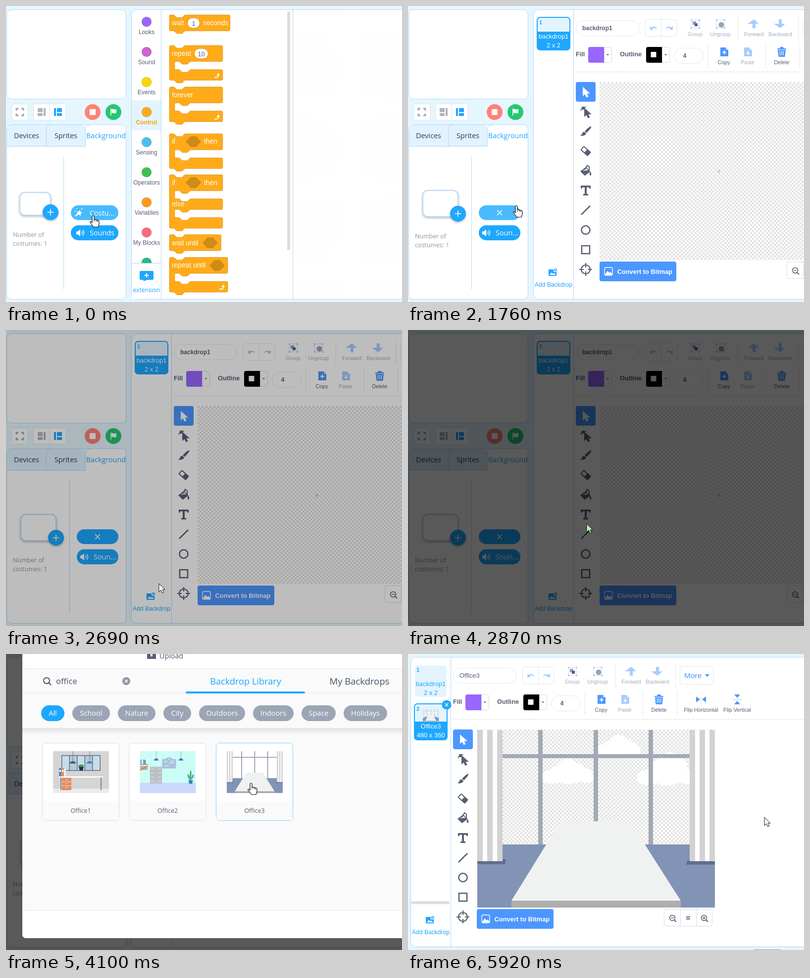
Write an HTML page that moves like this. It is 800 px wide and 600 px high and loops after 6.91 s.

```html
<!DOCTYPE html>
<html lang="en">
<head>
<meta charset="utf-8">
<title>Choosing a backdrop</title>
<style>
html, body { margin: 0; height: 100%; overflow: hidden; }
svg { display: block; width: 800px; height: 600px; font-family: "Liberation Sans", Arial, sans-serif; }
.ui { font-family: "Open Sans", "Noto Sans", sans-serif; }
.soft { filter: drop-shadow(0 2px 2px #0004); }
</style>
</head>
<body>
<svg id="stage" viewBox="0 0 800 600"></svg>
<script>
const BLUE = '#1ea7ff', PAINT = '#4c97ff', INK = '#575e75', EDGE = '#b4d8f8', PALE = '#e3f4ff', DARK = '#cf8b17', HOVER = '#4abaff';
const MID = ' text-anchor="middle" ', BOLD = ' font-weight="700" ', UI = ' class="ui" ', SOFT = ' class="soft" ';

const rect = (x, y, w, h, fill, r = 0, opt = '') => `<rect x="${x}" y="${y}" width="${w}" height="${h}" rx="${r}" fill="${fill}" ${opt}/>`;
const disc = (x, y, r, fill, opt = '') => `<circle cx="${x}" cy="${y}" r="${r}" fill="${fill}" ${opt}/>`;
const path = (d, fill, opt = '') => `<path d="${d}" fill="${fill}" ${opt}/>`;
const line = (d, color, w = 1, opt = '') => path(d, 'none', `stroke="${color}" stroke-width="${w}" ${opt}`);
const text = (x, y, s, size, fill = INK, opt = '') => `<text x="${x}" y="${y}" font-size="${size}" fill="${fill}" ${opt}>${s}</text>`;
const group = (id, body, opt = '') => `<g id="${id}" ${opt}>${body}</g>`;
const at = (x, y, body, k = 1) => `<g transform="translate(${x} ${y}) scale(${k})">${body}</g>`;
const border = (color, w = 1) => `stroke="${color}" stroke-width="${w}"`;
const plus = (x, y, r, color, w = 2) => line(`M${x - r} ${y}h${2 * r}M${x} ${y - r}v${2 * r}`, color, w);
const cross = (x, y, r, color, w = 2) => line(`M${x - r} ${y - r}l${2 * r} ${2 * r}m0 ${-2 * r}l${-2 * r} ${2 * r}`, color, w);

// Left column
const sidebar = () =>
  rect(1.5, 7.5, 241, 181, '#fff', 10, border(EDGE)) +
  rect(11.5, 198.5, 33, 33, '#fff', 4, border('#cfe4f7')) +
  line('M21 212v-4h4m6 0h4v4m0 6v4h-4m-6 0h-4v-4', '#a3a8b3', 3) +
  rect(55.5, 198.5, 66, 33, '#fff', 4, border('#cfe4f7')) + line('M88.5 199v32', '#cfe4f7') +
  path('M64 207h10v8h-10zM64 217h10v6h-10zM76 207h4v16h-4z', '#b0b4bd') +
  path('M97 207h4v16h-4zM103 207h10v8h-10zM103 217h10v6h-10z', BLUE) +
  disc(175, 215, 16, '#ff8276') + rect(169, 209, 12, 12, '#fff', 1) +
  disc(217, 215, 16, '#23c871') + path('M211 208h1.6v14h-1.6zM213 209c3-1 5 2 10 0v8c-5 2-7-1-10 0z', '#fff') +
  rect(1.5, 240.5, 241, 354, '#fff', 10, border(EDGE)) +
  path('M2 284V251q0-10 10-10H151q10 0 10 10V284z', '#e0f3ff') +
  line('M2 284.5H160.5V251q0-10 10-10M81.5 284V250q0-9 9-9', EDGE) +
  text(41.5, 268, 'Devices', 14.4, '#333d4d', MID + UI) + text(121, 268, 'Sprites', 14.4, '#333d4d', MID + UI) +
  text(202, 268, 'Background', 14.3, BLUE, MID + UI);

const speaker = path('M-8-3h3l5-4v14l-5-4h-3z', '#fff') + line('M3-3q2 3 0 6M5-6q5 6 0 12', '#fff', 1.4);
const costumes = (id, split, x, y, w, h, noteY, pillX, labelX, pillBody, sound) => group(id,
  line(`M${split + .5} 305V574`, EDGE) +
  rect(x + 1, y + 1, w - 1, h - 1, '#fff', 10, border('#bcd8f6', 2) + SOFT) +
  disc(x + w, y + h - 6, 16, BLUE, SOFT) + plus(x + w, y + h - 6, 6.5, '#fff', 1.6) +
  text(14, noteY, 'Number of', 12.4, '#8a94a6', UI) + text(14, noteY + 18, 'costumes: 1', 12.4, '#8a94a6', UI) +
  rect(pillX, 404, 227 - pillX, 30, HOVER, 15, `id="${id}Pill"`) + pillBody +
  rect(pillX, 444.5, 227 - pillX, 30.5, BLUE, 15) + at(labelX - 19, 460, speaker) +
  text(labelX, 465, sound, 14.4, '#fff', UI));

// Block palette
const NOTCH = 'c2 0 3 1 4 2l4 4c1 1 2 2 4 2h12c2 0 3-1 4-2l4-4c1-1 2-2 4-2';
const TAB = 'c-2 0-3 1-4 2l-4 4c-1 1-2 2-4 2h-12c-2 0-3-1-4-2l-4-4c-1-1-2-2-4-2';
const block = (y, w, rows) => {
  let d = `M0 4a4 4 0 0 1 4-4h8${NOTCH}H${w - 4}`;
  rows.forEach((h, i) => {
    d += `a4 4 0 0 1 4 4v${h - 8}a4 4 0 0 1-4 4`;
    d += i < rows.length - 1
      ? `H64${TAB}h-8a4 4 0 0 0-4 4v16a4 4 0 0 0 4 4h8${NOTCH}H${w - 4}`
      : `H48${TAB}H4a4 4 0 0 1-4-4z`;
  });
  return at(330, y, path(d, '#ffab19', border(DARK)), .678);
};
const word = (x, y, s) => text(x, y, s, 13.8, '#fff');
const slot = (x, y, w, s) => rect(x, y, w, 21, '#fff', 10.5, border(DARK)) + text(x + w / 2, y + 15.5, s, 13, INK, MID);
const hexagon = (x, y) => path(`M${x} ${y}l10-11h11l10 11-10 11h-11z`, DARK);
const loopArrow = (x, y) => at(x, y, line('M-5 4h4q4 0 4-5', '#fff', 1.8) + path('M-1 0l4-5 3 5z', '#fff'));

const categories = [['Looks', '#9966ff'], ['Sound', '#cf63cf'], ['Events', '#ffd500'], ['Control', '#ffab19'], ['Sensing', '#4cbfee'],
  ['Operators', '#40bf57'], ['Variables', '#ff9a1a'], ['My Blocks', '#ff6680'], ['', '#21bd8c']];
const palette = () => group('palette',
  rect(254, 191, 59, 61, PALE) +
  categories.map(([name, color], i) => disc(284, 32 + 61 * i, 9.8, color, 'stroke="#0003"') +
    text(284, 57 + 61 * i, name, 12, i === 3 ? '#ff9f0a' : INK, MID + (i === 3 ? BOLD : ''))).join('') +
  rect(254, 521, 59, 73, '#fff') +
  line('M254 521.5h59M313.5 8V594M579.5 8V594', EDGE) +
  path('M272 537h24q2 0 2 2v14q0 2-2 2h-12l-2 2h-4l-2-2h-4q-2 0-2-2v-14q0-2 2-2z', BLUE) + plus(284, 546, 4.5, '#fff') +
  text(284, 580, 'extension', 12.1, BLUE, MID + UI) +
  rect(568, 11, 6, 484, '#dcdcdc', 3) + rect(580, 9, 220, 585, 'url(#dots)') +
  block(18, 181, [48]) + word(335, 39, 'wait') + slot(366.5, 24, 25, '1') + word(398, 39, 'seconds') +
  block(80, 159, [48, 32]) + word(335, 101, 'repeat') + slot(380.5, 86, 28, '10') + loopArrow(426, 141) +
  block(164, 159, [48, 32]) + word(335, 185, 'forever') + loopArrow(426, 225) +
  block(259, 159, [48, 32]) + word(335, 279, 'if') + hexagon(363, 275) + word(400, 279, 'then') +
  block(342, 159, [48, 32, 32]) + word(335, 363, 'if') + hexagon(363, 358) + word(400, 363, 'then') + word(335, 406, 'else') +
  block(463.5, 154, [48]) + word(335, 485, 'wait until') + hexagon(397, 480) +
  block(509.5, 174, [48, 32]) + word(335, 530, 'repeat until') + hexagon(411, 526) + loopArrow(436, 570));

// Meeting room, 480 x 360
const stripes = x => rect(x, 0, 51, 266, '#d2d2d2') + rect(x + 11, 0, 9, 266, '#fff') + rect(x + 31, 0, 9, 266, '#fff');
const cloud = (x, y, w) => at(x, y, path('M-50 22Q-54 2-34 0Q-30-10-20-8Q-4-34 20-12Q26-14 32-4Q52 0 50 22Q36 28 24 22Q4 32-14 24Q-34 30-50 22z', '#fff'), w / 100);
const meetingRoom = () =>
  cloud(285, 29, 88) + cloud(183, 81, 104) + cloud(381, 81, 114) + cloud(389, 60, 70) +
  rect(0, 232, 480, 128, '#8194b6') +
  path('M123 0h9v232h-9zM235 0h9v232h-9zM346 0h9v232h-9zM50 49h380v8H50z', '#a3a9b6') +
  path('M0 266H50V262H58L56 272H0zM424 264H480V273H422z', '#5f6e8d') + stripes(0) + stripes(429) +
  path('M69 346L157 203Q168 185 178 185H301Q308 185 320 203L411 346z', '#f0f2f1') + rect(69, 346, 342, 14, '#aeaeae');

// Paint editor
const label = (x, y, s, color = INK) => text(x, y, s, 10.8, color, MID);
const vdash = (x, y, h) => line(`M${x} ${y}v${h}`, '#ccc', 1, 'stroke-dasharray="2 2"');
const curl = path('M-7-4v7h7l-2.5-2.3q6-3 9.500 2.300q-2-9-11-4.800z', '#a8ccff');
const groupIcon = round => rect(-8, -8, 16, 16, 'none', 0, border('#a8ccff') + 'stroke-dasharray="3 1"') +
  [-9, 7].map(x => [-9, 7].map(y => rect(x, y, 3, 3, '#a8ccff')).join('')).join('') +
  (round ? disc(2, 2, 5.5, '#9aa1b2') : rect(-5, -5, 7, 7, '#9aa1b2') + rect(-1, -1, 6, 6, INK));
const sheet = color => path('M-8-9h11l5 5v13h-16z', color) + path('M3-9l5 5h-5z', '#fff', 'opacity=".6"');
const upArrow = path('M0-9l10 9H3v9h-6V0h-10z', '#a8ccff');
const pointer = color => path('M-6-10V9l4.500-4 3 6.500 4-2-3-6h6.500z', color);
const picture = color => path('M-8-6h10v5h6v8h-16z', color) + path('M-6 5l4-5 3 3 2-2 4 4z', '#fff') + disc(6, -5, 3, color) + plus(6, -5, 2, '#fff', 1);
const lens = line('M4 4l4 4', INK, 1.8) + disc(0, 0, 5.500, 'none', border(INK, 1.500));
const swatch = (x, color) => rect(x + .5, 83.5, 47, 31, '#fff', 4, border('#d9d9d9')) +
  path(`M${x + 32} 83h-28q-4 0-4 4v24q0 4 4 4h28z`, color) + line(`M${x + 32.5} 83v32`, '#d9d9d9') + path(`M${x + 37} 97.5h5l-2.5 3z`, INK);

const tools = [
  pointer('#fff'),
  at(3, 2, pointer(INK)) + line('M-10-2Q-8-9 1-9', INK, 1.6) + rect(-8, -10, 6, 6, INK, 1),
  path('M11-10Q13-8 2 3L-2 0Q8-11 11-10zM-3 1L1 4Q0 10-11 9Q-8 7-7 4Q-6 1-3 1z', INK),
  at(0, 0, '<g transform="rotate(42)">' + rect(-10, -5.5, 20, 11, INK, 2) + rect(-8, -3.5, 8, 7, '#fff') + '</g>'),
  path('M-11 1L1-8 9 2-2 10z', INK) + path('M-6 0L1-5 5-1z', '#fff') + line('M-2-2L3-11 7-8V2', INK, 2) + path('M9 1q4 6 1 9-4-1-1-9z', INK),
  path('M-10-10H10v6H7v-2.500H2V7h3v3H-5V7h3V-6.500h-5V-4h-3z', INK),
  line('M-9 9L9-9', INK, 2.5),
  disc(0, 0, 8.5, 'none', border(INK, 2.5)),
  rect(-8, -8, 16, 16, 'none', 0, border(INK, 2.5)),
  disc(0, 0, 9, 'none', border(INK, 2.2)) + line('M0-13v9M0 4v9M-13 0h9M4 0h9', INK, 2.2)
];

const costumeText = (y, name, size, color) => text(294, y, name, 13, color, MID) + text(294, y + 18, size, 13, color, MID);
const activeCard = (y, h, n, thumb = '') => rect(261, y, 66, h, PALE, 6) + thumb +
  path(`M261 ${y + h - 37}h66v31q0 6-6 6h-54q-6 0-6-6z`, BLUE) + rect(261, y, 66, h, 'none', 6, border(BLUE, 2)) +
  text(265, y + 14, n, 11, BLUE, BOLD);

const editor = () => group('editor',
  line('M334.5 8V594', EDGE) +
  group('first', activeCard(23, 66, '1') + costumeText(66, 'backdrop1', '2 x 2', '#fff')) +
  group('second', rect(262, 24, 64, 64, PALE, 6) + text(265, 37, '1', 11, BLUE, BOLD) + costumeText(66, 'backdrop1', '2 x 2', BLUE) +
    activeCard(102, 73, '2', at(278, 113, meetingRoom(), .067)) + costumeText(152, 'Office3', '480 x 360', '#fff') +
    disc(326, 104, 9.5, BLUE) + cross(326, 104, 3.2, '#fff', 1.4) +
    rect(254, 502, 78, 6, '#dedede', 3) + line('M948 600.5h53', '#666', 1, 'stroke-dasharray="2 1"')) +
  group('add', at(292, 540, picture(BLUE)) + text(294, 569, 'Add Backdrop', 12.1, BLUE, MID)) +
  group('paint',
    rect(339.5, 29.5, 127, 31, '#fff', 15.5, border('#e6e8ee')) +
    text(352, 49, 'backdrop1', 12, INK, BOLD + 'id="name1"') + text(352, 49, 'Office3', 12.9, INK, 'id="name2"') +
    rect(479.5, 27.5, 64, 34, '#fff', 4, border('#e3e6ec')) + line('M511.5 28v33', '#e3e6ec') +
    at(496, 45, curl) + at(528, 45, '<g transform="scale(-1 1)">' + curl + '</g>') +
    at(580, 36, groupIcon(false)) + label(580, 61, 'Group', '#a6abb9') +
    at(631, 36, groupIcon(true)) + label(631, 61, 'Ungroup', '#a6abb9') +
    vdash(666.5, 20, 50) + at(699, 36, upArrow) + label(699, 61, 'Forward', '#a6abb9') +
    at(752, 36, '<g transform="scale(1 -1)">' + upArrow + '</g>') + label(752, 61, 'Backward', '#a6abb9') + vdash(788.5, 20, 50) +
    rect(797.5, 26.5, 68, 36, '#fff', 4, border('#e3e6ec')) + text(806, 50, 'More', 15.5, PAINT) + path('M848 42h9l-4.5 5.500z', PAINT) +
    text(339, 102, 'Fill', 12.6, INK, BOLD) + swatch(364, '#9966ff') +
    text(428, 102, 'Outline', 12.8, INK, BOLD) + swatch(481, '#000') + rect(490.5, 93, 11, 11, '#fff') +
    rect(537.5, 85.5, 59, 31, '#fff', 15.5, border('#e6e8ee')) + text(559, 105, '4', 12, INK, MID + BOLD) + vdash(605.5, 78, 48) +
    at(639, 93, sheet(PAINT) + plus(0, 1, 4, '#fff')) + label(638, 118, 'Copy') +
    at(687, 93, sheet('#a8ccff') + path('M0 6l-4-4h3v-4h2v4h3z', '#fff')) + label(686, 118, 'Paste', '#a6abb9') + vdash(722.5, 78, 48) +
    path('M746 86h5l1-3h6l1 3h5v2h-18zM747 89h16l-1.500 14h-13z', PAINT) + line('M751.5 91v9m3.5-9v9m3.500-9v9', '#fff', 1.3) + label(755, 118, 'Delete') +
    vdash(791.5, 78, 48) + path('M830 87l8 6-8 6zM850 87l-8 6 8 6z', PAINT) + vdash(840, 84, 18) + label(840, 118, 'Flip Horizontal') +
    path('M907 83h12l-6 7zM907 103h12l-6-7z', PAINT) + line('M904 93h18', PAINT, 1, 'stroke-dasharray="2 2"') + label(913, 118, 'Flip Vertical') +
    line('M339 133.500H1100', '#d5d5d5', 1, 'stroke-dasharray="3 2"') +
    rect(339, 154, 40, 40, PAINT, 4) + tools.map((icon, i) => at(359, 174 + 40 * i, icon)).join('') +
    rect(387, 154, 481, 361, 'url(#checker)') + path('M628 331l4 4-4 4-4-4z', '#d2d2d2') +
    group('room', meetingRoom(), 'transform="translate(388 155)"') +
    rect(387, 518, 155, 40, PAINT, 4) +
    at(405, 538, rect(-8, -8, 16, 16, 'none', 3, border('#fff', 1.4)) + path('M-7 6l5-7 4 4 2-2 4 5v1h-15z', '#fff')) +
    text(422.5, 542.5, 'Convert to Bitmap', 12.9, '#fff', BOLD) +
    rect(765.5, 518.500, 97, 34, '#fff', 4, border('#d9dce3')) + line('M798.5 519v33M830.5 519v33', '#d9dce3') +
    at(782, 536, lens + line('M-3 0h6', INK, 1.4)) + line('M810 534h8m-8 4h8', INK, 1.8) + at(846, 536, lens + plus(0, 0, 3, INK, 1.4))));

// Library thumbnails, 113 x 85
const office1 = rect(0, 0, 113, 85, '#d5d5d5') + rect(0, 76, 113, 9, '#ebebeb') +
  rect(17, 8, 79, 32, '#5d6c86') + [0, 1, 2, 3, 4].map(i => rect(18.5 + 15.5 * i, 9.500, 14, 29, i % 2 ? '#b5cade' : '#c9dcea')).join('') +
  line('M40 0v19M74 0v19', '#666', .8) + path('M33 25q7-10 14 0z', '#2d6e55') + path('M67 25q7-10 14 0z', '#4c80b5') +
  path('M52 32h10l-2 7h-6z', '#2b2d38') + path('M51 32q0-5 6-5 6 0 5 5z', '#3b9b5c') +
  rect(12, 51, 89, 2.500, '#fff') + line('M16 53v26M97 53v26', '#777e88', 1.800) +
  rect(18, 54, 19, 25, '#e58b62') + line('M18 62h19m-19 8h19M25 58h5m-5 8h5m-5 8h5', '#fff', .8) +
  rect(12, 34, 5, 17, '#5a8dbc') + rect(17, 34, 5, 17, '#e58b62') + rect(22, 36, 4, 15, '#eee') + rect(13, 38, 3, 4, '#fff') + rect(18, 38, 3, 4, '#fff');
const office2 = rect(0, 0, 113, 85, '#cbfdf6') + rect(0, 64, 113, 21, '#ccd9fc') +
  rect(21, 32, 23, 33, '#c5c9ce', 0, border('#a5abb2', .8)) + line('M21 40h23m-23 8h23m-23 8h23M30 36h5m-5 8h5m-5 8h5m-5 8h5', '#949ba5', .9) +
  line('M33 0v12M83 0v12', '#8a98a8', .8) + path('M28 19q5-10 10 0zM78 19q5-10 10 0z', '#487fc0') +
  line('M48 18l11-5 10 5', '#64748a', 1) + rect(45, 16, 28, 19, '#a9c1dd') + line('M49 21h7m3 3h10m-19 6h8m4-10h7', '#c5d7ea', 3) +
  [0, 1, 2, 3, 4].map(i => rect(1 + 3 * i, 17 + i % 2, 2.400, 9, ['#54a6cd', '#fff', '#477bb5'][i % 3]) + rect(1 + 3 * i, 30, 2, 8, ['#e5784e', '#54a6cd'][i % 2])).join('') +
  line('M0 27h17M0 39l16-9', '#dc7950', 1.5) +
  path('M102 60Q94 51 97 46Q102 50 102 60Q99 42 103 38Q106 44 102 60Q105 46 109 47Q110 53 102 60z', '#52ad83') + path('M98 59h9l-1.500 7h-6z', '#3f7fc0');
const outdoors = i => {
  const hue = 95 + i * 31;
  return rect(0, 0, 113, 85, `hsl(${195 + i * 9} 70% 84%)`) + disc(24 + i * 7, 19, 8, '#fff5c9') +
    path('M0 56Q28 30 58 52T113 45V85H0z', `hsl(${hue} 40% 68%)`) + path('M0 68Q50 55 113 70V85H0z', `hsl(${hue} 40% 56%)`);
};
const card = (x, y, name, scene, id = '') =>
  rect(x + .5, y + .5, 155, 157, '#fff', 7, border('#dcdcdc') + (id && `id="${id}"`)) +
  path(`M${x + 1} ${y + 118}h154v33q0 6-6 6h-142q-6 0-6-6z`, '#fafafa') + at(x + 22, y + 17, scene) +
  text(x + 78, y + 142, name, 12.4, INK, MID + UI);

const tags = [['All', 71, 47], ['School', 134, 76], ['Nature', 226, 76], ['City', 318, 56], ['Outdoors', 390, 93], ['Indoors', 499, 82], ['Space', 597, 69], ['Holidays', 682, 88]];
const scenery = ['Meadow', 'Harbor1', 'Desert', 'Village2', 'Hills', 'Seaside', 'Garden1', 'Canyon', 'Lake2', 'Farm'];
const library = () => group('library',
  rect(33, -22, 1117, 598, '#fafafa', 8) +
  path('M33 29V-14q0-8 8-8H1142q8 0 8 8V29z', '#fff') + path('M33 520H1150V568q0 8-8 8H41q-8 0-8-8z', '#fff') +
  rect(33, 150, 1117, 14, 'url(#fade)') + line('M33 29.5H1150M33 79.5H1150M33 519.5H1150', '#e4e6e8') +
  path('M285 0h5v-3h-3l7-7 7 7h-3v3h5v10h-18z', INK) + rect(292, -3, 4, 8, '#fff') + text(310, 9, 'Upload', 14.3, '#46536a', UI) +
  at(844, 1, line('M-6-6L6 6M-6 6L6-6', INK, 3.5) + line('M-8 2l5 5M3-7l5 5', INK, 2)) + text(858, 9, 'Paint', 14.6, '#46536a', UI) +
  disc(82, 54, 6, 'none', border('#46536a', 2)) + line('M86 58l5 5', '#46536a', 2.2) +
  group('hint', text(101, 61, 'Search', 16.6, '#b5bac4', UI)) +
  group('query', text(101, 61, 'office', 16.6, '#46536a', UI) + disc(243, 55, 8, '#8e97a5') + cross(243, 55, 3, '#fff', 1.6)) +
  group('caret', line('M145.5 45v21', '#333')) +
  text(484, 62, 'Backdrop Library', 18.2, BLUE, MID + UI) + text(714, 62, 'My Backdrops', 18.5, '#46536a', MID + UI) + rect(363, 76, 241, 4, BLUE, 2) +
  tags.map(([name, x, w], i) => rect(x, 104, w, 32, i ? '#9ca5b5' : BLUE, 16) + text(x + w / 2, 125, name, 14.5, '#fff', MID + UI + 'font-weight="500"')).join('') +
  group('everything', scenery.map((name, i) => card(73 + 175.5 * (i % 5), i < 5 ? 180 : 358, name, outdoors(i))).join('')) +
  group('found', card(73, 180, 'Office1', office1) + card(248.5, 180, 'Office2', office2) + card(424, 180, 'Office3', at(0, 0, meetingRoom(), .2354), 'pick')) +
  rect(845.5, 532.5, 127, 31, '#fff', 15.5, border(BLUE)) + text(909, 553, 'Cancel', 14.3, BLUE, MID + UI) +
  rect(993, 532, 128, 32, BLUE, 16, 'id="ok"') + text(1057, 553, 'OK', 14.3, '#fff', MID + UI));

const $ = id => document.getElementById(id);
const set = (id, attrs) => Object.entries(attrs).forEach(([k, v]) => $(id).setAttribute(k, v));
const show = (id, on) => $(id).setAttribute('display', on ? 'inline' : 'none');

$('stage').innerHTML = `<defs>
  <pattern id="checker" width="8" height="8" patternUnits="userSpaceOnUse" x="387" y="154">${rect(0, 0, 8, 8, '#fff') + path('M0 0h4v8h4v-4H0z', '#e3e3e3')}</pattern>
  <pattern id="dots" width="18" height="18" patternUnits="userSpaceOnUse" x="583" y="9">${rect(8, 8, 1.500, 1.500, '#dedede')}</pattern>
  <linearGradient id="fade" x2="0" y2="1"><stop stop-color="#000" stop-opacity=".1"/><stop offset="1" stop-color="#000" stop-opacity="0"/></linearGradient></defs>` +
  rect(0, 0, 800, 600, '#e6f6ff') +
  group('camera', sidebar() +
    costumes('idle', 116, 27, 377, 63, 47, 468, 131, 169,
      at(147, 419, line('M-7 7L0 0', '#fff', 2.500) + path('M2-6l1 4 4 1-3 3 0 4-4-2-4 1 2-4-2-4 4 1z', '#fff') + line('M-4-7v-2M5-6l2-3M-7-3h-2', '#fff', 1.4)) + text(169, 424.5, 'Costu...', 14.4, '#fff', UI), 'Sounds') +
    costumes('open', 128, 29, 373, 72, 54, 471, 143, 177, cross(185, 419, 5, '#fff', 1.7), 'Soun...') +
    rect(253.5, 7.5, 1000, 587, '#fff', 10, border(EDGE)) + palette() + editor()) +
  rect(0, 0, 800, 600, '#000', 0, 'id="dim"') + library() +
  group('arrow', path('M0 0V17l4-4 2.800 6 2.800-1.300L7 12h5z', '#fff', border('#111') + 'id="tip"')) +
  group('hand', path('M-2 2c0-3 4-3 4 0v6q3-1 4 1 3-1 3 1 3-1 3 2v5l-2 6H1l-7-9c-1-2 1-3 3-1l1 1z', '#fff', border('#111', 1.200)) + line('M2 8v4M6 9v3M9 10v3', '#111', .9));

// Each step keeps everything it does not change
const steps = [
  [0, { view: 'blocks', hand: true, x: 176, y: 425, pill: HOVER, dim: 0, modal: 0, shift: [0, 0], cards: '', pick: 0, tip: '#fff', add: 1, ok: BLUE }],
  [620, { pill: '#1590e2' }],
  [720, { pill: HOVER }],
  [1290, { view: 'opening' }],
  [1400, { view: 'editor' }],
  [1760, { x: 219, y: 405 }],
  [1850, { hand: false, x: 240, y: 432, pill: BLUE }],
  [1940, { x: 259, y: 466 }],
  [2030, { x: 273, y: 500 }],
  [2130, { x: 287, y: 528 }],
  [2220, { hand: true, x: 296, y: 548, add: .7 }],
  [2430, { add: 1 }],
  [2510, { hand: false, dim: .04 }],
  [2600, { x: 300, y: 540, dim: .12 }],
  [2690, { x: 309, y: 514, dim: .26 }],
  [2790, { x: 335, y: 455, dim: .48 }],
  [2870, { x: 361, y: 393, dim: .65, tip: '#b6f5b6' }],
  [2970, { x: 385, y: 335, tip: '#fff' }],
  [3050, { x: 400, y: 300 }],
  [3150, { modal: .35 }],
  [3240, { modal: .7 }],
  [3340, { modal: 1 }],
  [3610, { cards: 'all' }],
  [4100, { cards: 'office', hand: true, x: 495, y: 262, pick: 1 }],
  [4180, { caret: true }],
  [4460, { caret: false, pick: 2 }],
  [4550, { pick: 3 }],
  [5100, { shift: [-351, 22], hand: false, x: 671, y: 430 }],
  [5180, { x: 676, y: 452 }],
  [5270, { x: 684, y: 488 }],
  [5370, { x: 692, y: 526 }],
  [5460, { hand: true, x: 699, y: 556, ok: HOVER }],
  [5560, { x: 703, y: 565 }],
  [5650, { x: 705, y: 568 }],
  [5820, { modal: .5, dim: .45 }],
  [5870, { view: 'done', modal: 0, dim: .25 }],
  [5920, { hand: false, x: 720, y: 331, dim: 0 }]
];

function render(t) {
  const s = Object.assign({}, ...steps.filter(([start]) => start <= t).map(([, change]) => change));
  const blocks = s.view === 'blocks', done = s.view === 'done', office = s.cards === 'office';
  const visible = {
    palette: blocks, idle: blocks, editor: !blocks, open: !blocks, paint: s.view !== 'opening',
    first: !done, second: done, name1: !done, name2: done, room: done,
    library: s.modal > 0, hint: !office, query: office, caret: s.caret, everything: s.cards === 'all', found: office,
    hand: s.hand, arrow: !s.hand
  };
  Object.entries(visible).forEach(([id, on]) => show(id, on));
  set('camera', { transform: done ? 'translate(-248 -1)' : '' });
  set('library', { transform: `translate(${s.shift})`, opacity: s.modal });
  set('dim', { opacity: s.dim });
  set('idlePill', { fill: s.pill });
  set('openPill', { fill: s.pill });
  set('add', { opacity: s.add });
  set('ok', { fill: s.ok });
  set('pick', { stroke: ['#dcdcdc', '#86d0fb', '#4ab8ff', '#35aefc'][s.pick], 'stroke-width': s.pick > 2 ? 1.5 : 1,
    style: s.pick > 1 ? 'filter:drop-shadow(0 1px 2px #1ea7ffb0)' : '' });
  set('tip', { fill: s.tip });
  set(s.hand ? 'hand' : 'arrow', { transform: `translate(${s.x} ${s.y})` });
}

const began = performance.now();
function tick() {
  render((performance.now() - began) % 6910);
  requestAnimationFrame(tick);
}
tick();
</script>
</body>
</html>
```
